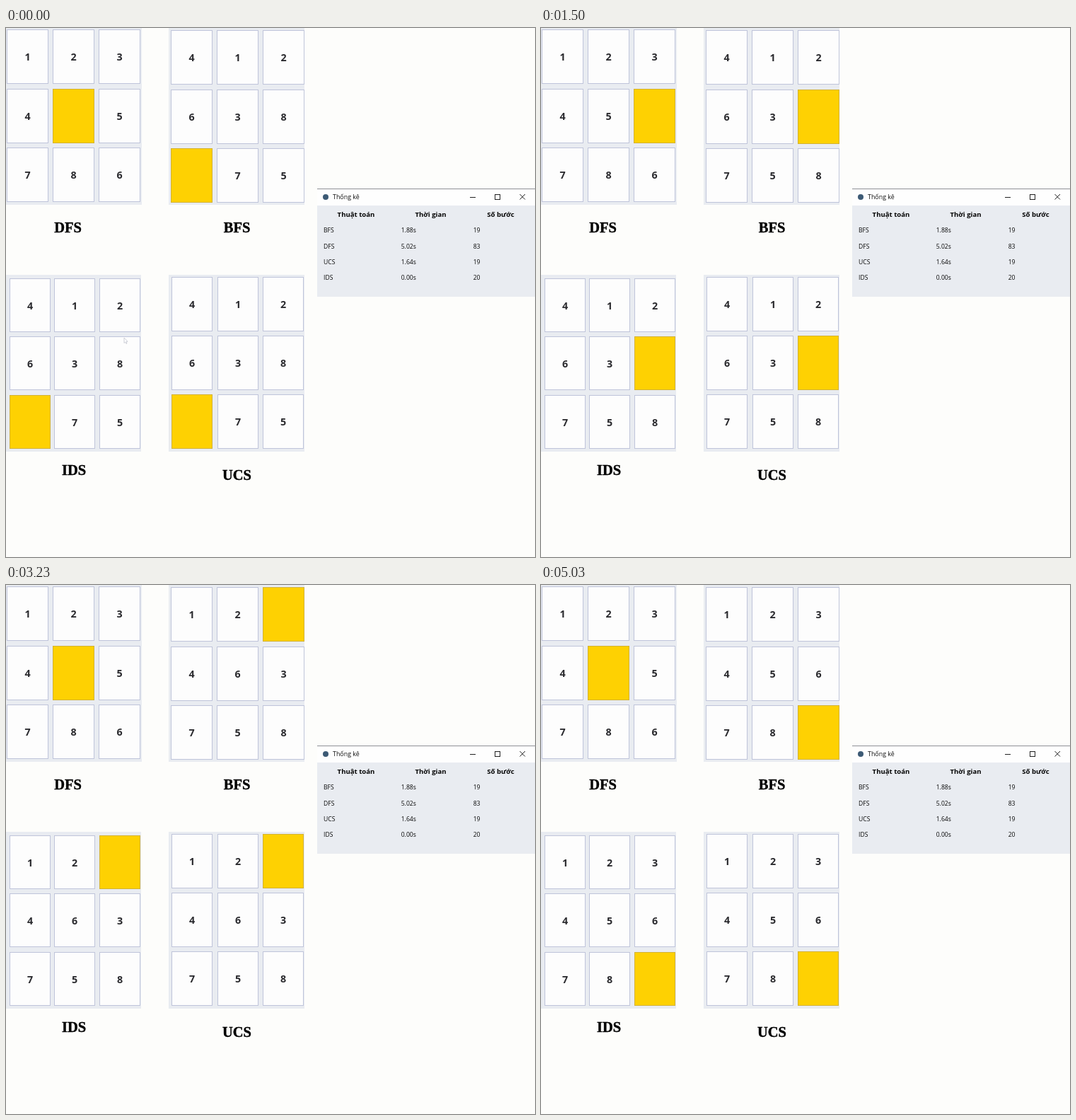
These frames come from a looping animation (748 px wide and 748 px high, 5.06 s). An HTML page with a canvas:

```html
<!DOCTYPE html>
<html lang="vi">
<head>
<meta charset="utf-8">
<title>8-puzzle</title>
<style>
html, body { margin: 0; width: 100%; height: 100%; overflow: hidden; background: #fdfdfb; }
canvas { display: block; }
</style>
</head>
<body>
<canvas id="c" width="748" height="748"></canvas>
<script>
const ctx = document.getElementById('c').getContext('2d');
const LOOP = 5060, STEP = 400;
const SANS = '"Open Sans", "Noto Sans", sans-serif';
const SERIF = '"Liberation Serif", "Noto Serif", serif';
const PANEL = '#e9ecf1';
const SHIFT = { U: -3, D: 3, L: -1, R: 1 };
const PATH = 'RRULLURRDLDR';

// bg: panel box; x, y: first tile; w, h: tile size; dx, dy: pitch
const boards = [
  { name: 'DFS', lx: 87.5, ly: 288.5, bg: [0, 0, 192, 250], x: 1, y: 2, w: 59, h: 77, dx: 65, dy: 83.7, start: '123405786', path: 'RDULRLRLRLRL' },
  { name: 'BFS', lx: 326.5, ly: 288.5, bg: [230, 0, 192, 250], x: 233, y: 3, w: 59, h: 77, dx: 65, dy: 83.7, start: '412638075', path: PATH },
  { name: 'IDS', lx: 96, ly: 631.5, bg: [0, 349, 191, 250], x: 4.5, y: 354, w: 58, h: 76, dx: 63.9, dy: 82.3, start: '412638075', path: PATH },
  { name: 'UCS', lx: 326.5, ly: 638.5, bg: [230, 349, 192, 250], x: 234, y: 351.5, w: 58, h: 77, dx: 64.7, dy: 83.3, start: '412638075', path: PATH }
];

function rect(x, y, w, h, color) {
  ctx.fillStyle = color;
  ctx.fillRect(x, y, w, h);
}

function text(str, x, y, font, color, align = 'left') {
  ctx.font = font;
  ctx.fillStyle = color;
  ctx.textAlign = align;
  ctx.fillText(str, x, y);
}

function line(points, color) {
  ctx.beginPath();
  points.forEach(([x, y], i) => i ? ctx.lineTo(x, y) : ctx.moveTo(x, y));
  ctx.strokeStyle = color;
  ctx.lineWidth = 1;
  ctx.stroke();
}

function stateAfter(start, path, n) {
  const cells = [...start];
  let hole = cells.indexOf('0');
  for (const move of path.slice(0, n)) {
    const next = hole + SHIFT[move];
    cells[hole] = cells[next];
    cells[next] = '0';
    hole = next;
  }
  return cells;
}

function drawBoard(b, n) {
  rect(...b.bg, PANEL);
  stateAfter(b.start, b.path, n).forEach((v, i) => {
    const x = Math.round(b.x + (i % 3) * b.dx);
    const y = Math.round(b.y + Math.floor(i / 3) * b.dy);
    const hole = v === '0';
    rect(x, y, b.w, b.h, hole ? '#d3b233' : '#bfc4da');
    rect(x + 1, y + 1, b.w - 2, b.h - 2, hole ? '#fed102' : '#fdfdfd');
    if (!hole) text(v, x + b.w / 2, y + b.h / 2 + 5.6, 'bold 14.3px ' + SANS, '#2a2a2e', 'center');
  });
  text(b.name, b.lx, b.ly, 'bold 20.5px ' + SERIF, '#000', 'center');
  ctx.strokeStyle = '#000';
  ctx.lineWidth = 0.4;
  ctx.strokeText(b.name, b.lx, b.ly);
}

function drawStats() {
  rect(440, 227, 308, 153, PANEL);
  rect(440, 227, 308, 24, '#fefefe');
  rect(440, 227, 308, 1, '#8f9196');
  ctx.fillStyle = '#3d5a75';
  ctx.beginPath();
  ctx.arc(452, 239, 4, 0, Math.PI * 2);
  ctx.fill();
  text('Thống kê', 462, 242.3, '8.9px ' + SANS, '#111');
  line([[656, 239.5], [664, 239.5]], '#222');
  ctx.strokeRect(691.5, 235.5, 7, 7);
  line([[726.5, 235], [734, 242.5]], '#222');
  line([[734, 235], [726.5, 242.5]], '#222');

  const head = 'bold 9.6px ' + SANS;
  text('Thuật toán', 495, 267.3, head, '#050505', 'center');
  text('Thời gian', 600.5, 267.3, head, '#050505', 'center');
  text('Số bước', 699.5, 267.3, head, '#050505', 'center');
  [['BFS', '1.88s', '19'], ['DFS', '5.02s', '83'], ['UCS', '1.64s', '19'], ['IDS', '0.00s', '20']]
    .forEach((row, i) => row.forEach((s, j) =>
      text(s, [449, 558.7, 660.7][j], 289.4 + i * 22.3, '8.6px ' + SANS, '#080808')));
}

function drawCursor() {
  ctx.beginPath();
  [[167, 438], [167, 445.5], [168.8, 444], [170, 446.5], [171, 446], [170, 443.5], [172, 443.3]]
    .forEach(([x, y]) => ctx.lineTo(x, y));
  ctx.closePath();
  ctx.fillStyle = '#fff';
  ctx.fill();
  ctx.strokeStyle = '#c2c4ce';
  ctx.lineWidth = 0.8;
  ctx.stroke();
}

function frame() {
  const t = performance.now() % LOOP;
  rect(0, 0, 748, 748, '#fdfdfb');
  boards.forEach(b => drawBoard(b, Math.floor(t / STEP)));
  drawStats();
  if (t < STEP) drawCursor();
  requestAnimationFrame(frame);
}
frame();
</script>
</body>
</html>
```
